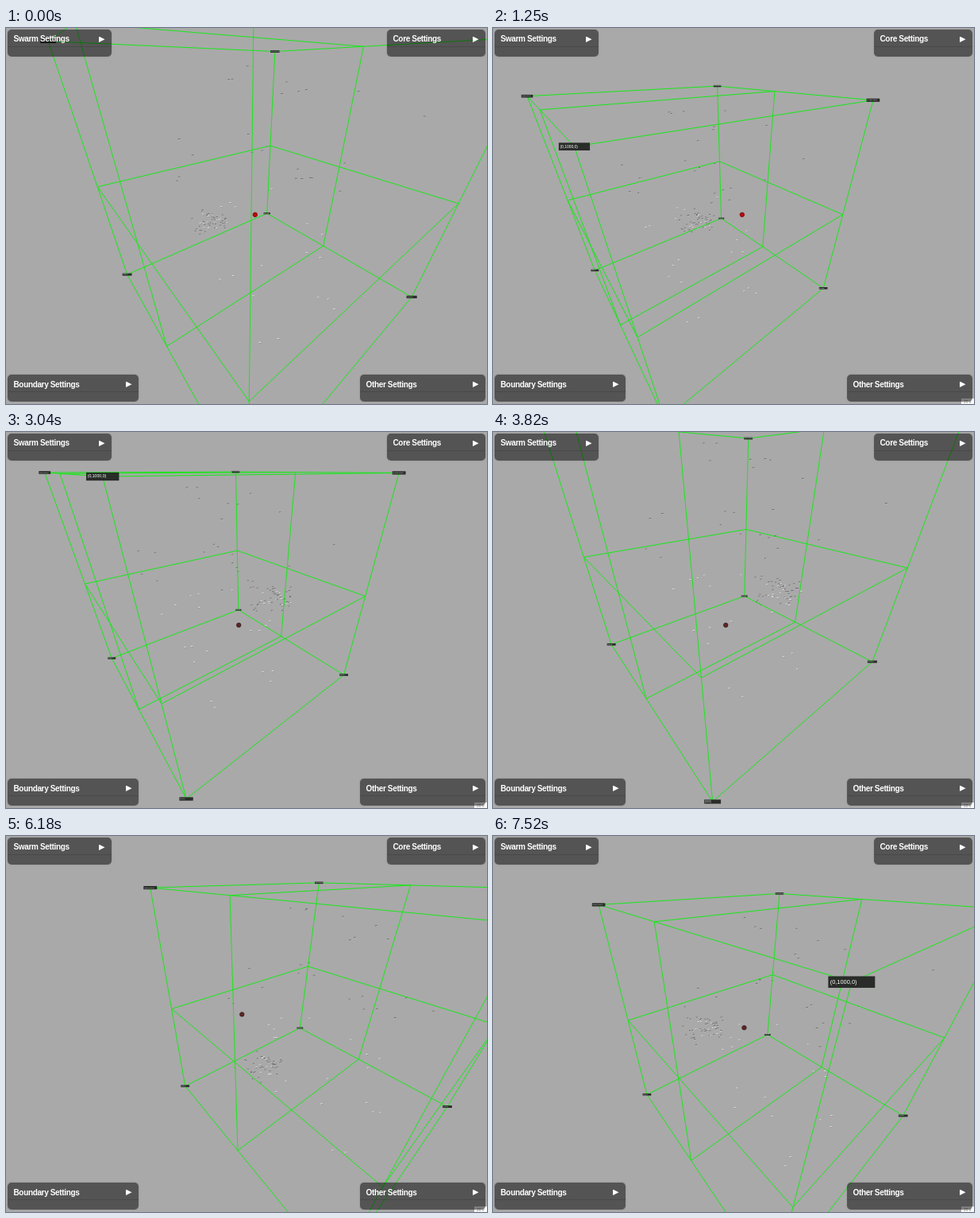
Recreate the animation shown at these times as an HTML page with a canvas. Size 606 by 473 pixels, loop 7590 ms.

```html
<!DOCTYPE html>
<html lang="en">
<head>
<meta charset="utf-8">
<title>Swarm in a box</title>
<style>
  html, body { margin: 0; width: 606px; height: 473px; overflow: hidden; background: #a9a9a9; }
  canvas { position: absolute; left: 0; top: 0; }
  .panel {
    position: absolute; box-sizing: border-box; height: 33.5px; padding-left: 7.5px; border-radius: 5px;
    background: linear-gradient(#0000 21px, #0002 21px 22px, #0000 22px) rgba(0, 0, 0, .5);
    box-shadow: 0 0 2px #0003; color: #fff; white-space: nowrap;
    font: bold 10px/24px "Liberation Sans", Arial, sans-serif; letter-spacing: -.35px;
  }
  .panel::after {
    content: ""; position: absolute; right: 8.5px; top: 8.5px; width: 7.5px; height: 7.5px;
    background: #fff; clip-path: polygon(0 0, 100% 50%, 0 100%);
  }
  .high { top: 2px; }
  .low { top: 436px; line-height: 25px; }
</style>
</head>
<body>
<canvas id="stage" width="606" height="473"></canvas>
<div class="panel high" style="left:2px;width:131px">Swarm Settings</div>
<div class="panel high" style="left:480px;width:124px">Core Settings</div>
<div class="panel low" style="left:2px;width:165px">Boundary Settings</div>
<div class="panel low" style="left:446px;width:158px">Other Settings</div>
<script>
const LOOP = 7.59, WIDTH = 606, HEIGHT = 473;
const FOCAL = 312, NEAR = .03, REACH = 1.53;
const CORE_LEAD = .25, FLOCK_LAG = 1.2;
const PITCH = 31.1 * Math.PI / 180, YAW = 39 * Math.PI / 180;
const sinP = Math.sin(PITCH), cosP = Math.cos(PITCH), sinY = Math.sin(YAW), cosY = Math.cos(YAW);
const ctx = document.getElementById('stage').getContext('2d');

// Turning points of the flight: seconds, then right, up, forward in box sides
const route = [
  [0, -.152, .932, -1.582],
  [2.04, .266, 1.22, -1.936],
  [4.73, -.265, .65, -1.668],
  [6.73, -.484, 1.19, -1.665],
  [LOOP, -.254, 1.089, -1.652]
];

// Straight, steady flight between turns; the end legs extend beyond the route
function flight(t) {
  let i = 0;
  while (i < route.length - 2 && t >= route[i + 1][0]) i++;
  const [t0, ...a] = route[i], [t1, ...b] = route[i + 1];
  const f = (t - t0) / (t1 - t0);
  return a.map((v, k) => v + (b[k] - v) * f);
}

// The point straight ahead of the camera at its place at time t
function aim(t) {
  const [right, up, forward] = flight(t);
  return [right, up - sinP * REACH, forward + cosP * REACH];
}

// Box coordinates, 0..1 from the far floor corner, to world coordinates
const place = ([u, v, w]) => [u * sinY - v * cosY, w, -u * cosY - v * sinY];

// World coordinates to camera coordinates: right, down, depth
function view(p, camera) {
  const [x, up, forward] = p.map((v, i) => v - camera[i]);
  return [x, -forward * sinP - up * cosP, forward * cosP - up * sinP];
}

const project = ([x, y, z]) => [WIDTH / 2 + FOCAL * x / z, HEIGHT / 2 + FOCAL * y / z];

const corners = Array.from({ length: 8 }, (_, i) => [i & 1, i >> 1 & 1, i >> 2]);
const square = [[0, 0], [0, 1], [1, 1], [1, 0]];
const edges = [];
for (let axis = 0; axis < 3; axis++) {
  for (const pair of square) {
    edges.push([0, 1].map(end => pair.toSpliced(axis, 0, end)));
  }
}
// Halving frames, one level and one upright
square.forEach(([a, b], i) => {
  const [c, d] = square[(i + 1) % 4];
  edges.push([[a, b, .5], [c, d, .5]], [[.5, a, b], [.5, c, d]]);
});

function clip(p, q) {
  if (p[2] >= NEAR) return p;
  const f = (NEAR - p[2]) / (q[2] - p[2]);
  return p.map((v, i) => v + (q[i] - v) * f);
}

function drawBox(camera) {
  ctx.strokeStyle = '#18e818';
  ctx.lineWidth = 1;
  for (const edge of edges) {
    const [a, b] = edge.map(p => view(place(p), camera));
    if (a[2] < NEAR && b[2] < NEAR) continue;
    ctx.beginPath();
    ctx.moveTo(...project(clip(a, b)));
    ctx.lineTo(...project(clip(b, a)));
    ctx.stroke();
  }
}

function drawLabel(corner, camera) {
  const p = view(place(corner), camera);
  if (p[2] < NEAR) return;
  const [x, y] = project(p), w = 15.4 / p[2], h = 3.8 / p[2];
  const [u, v, up] = corner;
  ctx.fillStyle = 'rgba(32,34,32,.92)';
  ctx.fillRect(x - w / 2, y - h / 2, w, h);
  ctx.fillStyle = '#fff';
  ctx.textBaseline = 'middle';
  ctx.font = `${h * .51}px "Liberation Sans", Arial, sans-serif`;
  ctx.fillText(`(${(1 - u) * 1000},${up * 1000},${(1 - v) * 1000})`, x - w * .46, y);
}

// Evenly scattered 0..1 numbers
const scatter = (i, step) => (i * step + .37) % 1;
const flock = Array.from({ length: 56 }, (_, i) => {
  const angle = i * 2.4, r = .13 * Math.sqrt((i + .5) / 56) * (.6 + .6 * scatter(i, .618));
  return { angle, r, up: .11 * (scatter(i, .7549) - .5), rate: .5 + scatter(i, .5698) };
});
const strays = Array.from({ length: 22 }, (_, i) => ({
  at: [.8192, .6710, .5497].map(step => .06 + .88 * scatter(i + 1, step)),
  phase: i * 1.7, size: 1 + i % 3
}));

function drawBird(point, camera, light) {
  const p = view(point, camera);
  if (p[2] < .2) return;
  const [x, y] = project(p), size = Math.min(1.4, .5 + .8 / p[2]);
  ctx.fillStyle = light ? '#e2e2e2' : '#6c6c6c';
  ctx.fillRect(x - size, y - .5, 2 * size, 1);
  ctx.fillStyle = light ? '#7c7c7c' : '#c4c4c4';
  ctx.fillRect(x, y + .5, size, .7);
}

function drawSwarm(t, camera) {
  const [cx, cy, cz] = aim(t - FLOCK_LAG);
  flock.forEach((b, i) => {
    const a = b.angle + .5 * Math.sin(t * b.rate + i);
    drawBird([cx + b.r * Math.cos(a), cy + b.up, cz + b.r * Math.sin(a)], camera, i % 4 === 0);
  });
  for (const { at: [u, v, w], phase, size } of strays) {
    for (let k = 0; k < size; k++) {
      const a = phase + t * .5 + k * 2.4;
      const spot = [u + .04 * Math.sin(a), v + .04 * Math.cos(a), w + .03 * Math.sin(a * 1.3)];
      drawBird(place(spot), camera, w < .45);
    }
  }
}

function drawCore(t, camera) {
  const bright = t < route[1][0];
  ctx.beginPath();
  ctx.arc(...project(view(aim(t + CORE_LEAD), camera)), 2.7, 0, 7);
  ctx.fillStyle = bright ? '#c00808' : '#602424';
  ctx.fill();
  ctx.strokeStyle = bright ? '#7c1010' : '#3c2828';
  ctx.stroke();
}

function drawCounter() {
  ctx.fillStyle = '#fafafa';
  ctx.fillRect(590, 466, 16, 7);
  ctx.fillStyle = '#888';
  ctx.font = '5px "Liberation Sans", Arial, sans-serif';
  ctx.fillText('20 fr', 593, 470.5);
}

function draw(t) {
  const camera = flight(t);
  ctx.fillStyle = '#a9a9a9';
  ctx.fillRect(0, 0, WIDTH, HEIGHT);
  drawSwarm(t, camera);
  drawBox(camera);
  drawCore(t, camera);
  for (const corner of corners) drawLabel(corner, camera);
  if (t > .8) drawCounter();
}

const start = performance.now();
function tick() {
  draw((performance.now() - start) / 1000 % LOOP);
  requestAnimationFrame(tick);
}
tick();
</script>
</body>
</html>
```
